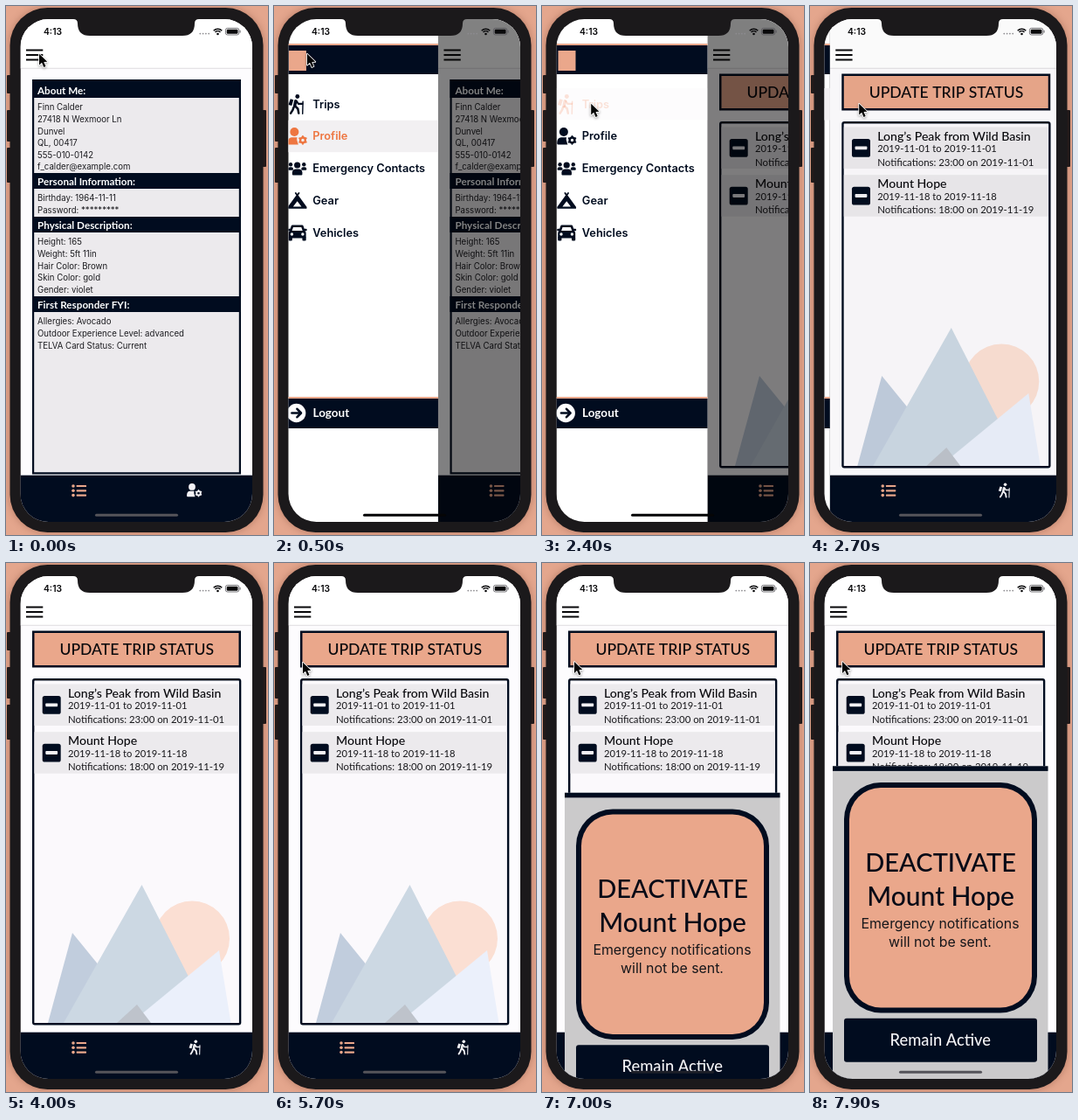
An HTML page with a canvas for the animation above (8 s loop, 300 by 605 pixels).

```html
<!DOCTYPE html>
<html lang="en">
<head>
<meta charset="utf-8">
<title>Trip planner app</title>
<style>
html, body { margin: 0; width: 100%; height: 100%; overflow: hidden; background: #e4a68d; }
canvas { display: block; width: 300px; height: 605px; }
</style>
</head>
<body>
<canvas id="stage"></canvas>
<script>
const W = 300, H = 605, LOOP = 8000;
const NAVY = '#010c1f', PEACH = '#eaa78b', ORANGE = '#ee7641', ROW = '#eceaed';
const SANS = 'Inter, Roboto, sans-serif', GEO = 'Lato, "Open Sans", sans-serif';
const LEFT = 16.5, RIGHT = 282, TOP = 15, BOTTOM = 590, DRAWER = 173;

const canvas = document.getElementById('stage');
const c = canvas.getContext('2d');
const ratio = window.devicePixelRatio || 1;
canvas.width = W * ratio;
canvas.height = H * ratio;

const clamp = v => Math.max(0, Math.min(1, v));
const ramp = (t, a, b) => clamp((t - a) / (b - a));

// Critically damped spring, time in ms
function spring(t) {
  if (t <= 0) return 0;
  const x = 0.01826 * t;
  return 1 - (1 + x) * Math.exp(-x);
}

function box(x, y, w, h, color) {
  c.fillStyle = color;
  c.fillRect(x, y, w, h);
}

function round(x, y, w, h, r, color) {
  c.fillStyle = color;
  c.beginPath();
  c.roundRect(x, y, w, h, r);
  c.fill();
}

function framed(x, y, w, h, b, r, edge, fill) {
  round(x, y, w, h, r, edge);
  round(x + b, y + b, w - 2 * b, h - 2 * b, Math.max(0, r - b), fill);
}

function dot(x, y, r, color) {
  c.fillStyle = color;
  c.beginPath();
  c.arc(x, y, r, 0, 7);
  c.fill();
}

function poly(points, color) {
  c.fillStyle = color;
  c.beginPath();
  points.forEach(p => c.lineTo(p[0], p[1]));
  c.closePath();
  c.fill();
}

function line(points, width, color) {
  c.strokeStyle = color;
  c.lineWidth = width;
  c.lineCap = c.lineJoin = 'round';
  c.beginPath();
  points.forEach(p => c.lineTo(p[0], p[1]));
  c.stroke();
}

function text(str, x, y, size, color, font = SANS, weight = 400, align = 'left') {
  c.font = `${weight} ${size}px ${font}`;
  c.textAlign = align;
  c.fillStyle = color;
  c.fillText(str, x, y);
}

function place(x, y, scale, draw) {
  c.save();
  c.translate(x, y);
  c.scale(scale, scale);
  draw();
  c.restore();
}

// Icons, drawn from their top left corner
function hiker(color) {
  dot(11.5, 2.6, 2.5, color);
  poly([[3.2, 5.5], [6.8, 6.5], [4.8, 13.5], [0.8, 12.4]], color);
  line([[9.4, 8], [8.2, 14]], 3.6, color);
  line([[9, 14], [12, 17], [13, 22.3]], 2.6, color);
  line([[7, 15.5], [6, 18.5], [3.6, 22.3]], 2.6, color);
  line([[10.5, 8], [12.6, 11.2], [17.5, 11.2]], 2.1, color);
  line([[18, 8.5], [17.6, 23]], 1.5, color);
}

function person(x, y, r, w, h, color) {
  dot(x, y, r, color);
  round(x - w / 2, y + r + 0.8, w, h, [w * 0.36, w * 0.36, 1, 1], color);
}

function userCog(color) {
  dot(7.7, 5, 5, color);
  c.fillStyle = color;
  c.beginPath();
  c.moveTo(0, 18);
  c.quadraticCurveTo(0, 11.2, 5, 11.2);
  c.lineTo(10.8, 11.2);
  c.lineTo(10.5, 14);
  c.lineTo(12.2, 19.6);
  c.lineTo(1.6, 19.6);
  c.quadraticCurveTo(0, 19.6, 0, 18);
  c.fill();
  c.strokeStyle = color;
  c.lineWidth = 2.4;
  c.beginPath();
  c.arc(17.3, 14.4, 2.9, 0, 7);
  c.stroke();
  for (let i = 0; i < 6; i++) {
    const a = Math.PI / 6 + i * Math.PI / 3, u = Math.cos(a), v = Math.sin(a);
    line([[17.3 + 3.7 * u, 14.4 + 3.7 * v], [17.3 + 4.4 * u, 14.4 + 4.4 * v]], 2, color);
  }
}

function users(color) {
  person(3.4, 3.2, 2.2, 6, 3.6, color);
  person(18.6, 3.2, 2.2, 6, 3.6, color);
  person(11, 4, 3.6, 11.5, 7, color);
}

function tent(color) {
  line([[9.2, 1], [21, 17.2]], 1.9, color);
  line([[12.8, 1], [1, 17.2]], 1.9, color);
  c.fillStyle = color;
  c.beginPath();
  [[11, 3.5], [20.5, 16.5], [22, 18.8], [0, 18.8], [1.5, 16.5]].forEach(p => c.lineTo(...p));
  c.closePath();
  [[11, 10.2], [6.2, 16.6], [15.8, 16.6]].forEach((p, i) => i ? c.lineTo(...p) : c.moveTo(...p));
  c.closePath();
  c.fill('evenodd');
}

function car(color) {
  line([[3.4, 7.5], [5.4, 1.8], [16.6, 1.8], [18.6, 7.5]], 2.6, color);
  round(0, 4.8, 4, 2.4, 1, color);
  round(18, 4.8, 4, 2.4, 1, color);
  c.fillStyle = color;
  c.beginPath();
  c.roundRect(1, 7, 20, 8.4, [3, 3, 1, 1]);
  for (const x of [4.8, 17.2]) {
    c.moveTo(x + 1.7, 11);
    c.arc(x, 11, 1.7, 0, 7);
  }
  c.fill('evenodd');
  round(1, 14, 4.2, 4.4, 1.2, color);
  round(16.8, 14, 4.2, 4.4, 1.2, color);
}

function list(color) {
  for (let i = 0; i < 3; i++) {
    dot(2, 2 + i * 5.3, 1.8, color);
    round(5.6, 0.9 + i * 5.3, 11.4, 2.2, 0.6, color);
  }
}

function header() {
  box(LEFT, TOP, RIGHT - LEFT, BOTTOM - TOP, '#fdfcfe');
  box(LEFT, TOP, RIGHT - LEFT, 56, '#fff');
  box(LEFT, 70.8, RIGHT - LEFT, 0.8, '#d6d5d8');
  for (let i = 0; i < 3; i++) box(23, 49.5 + i * 5.5, 19.3, 2, '#08080a');
}

function tabs(icon, x, y, scale) {
  box(LEFT, 536.7, RIGHT - LEFT, BOTTOM - 536.7, NAVY);
  place(75, 547, 1, () => list(PEACH));
  place(x, y, scale, () => icon('#f4f3f6'));
}

const sections = [
  ['About Me:', 84, 21, ['Finn Calder', '27418 N Wexmoor Ln', 'Dunvel', 'QL, 00417', '555-010-0142', 'f_calder@example.com']],
  ['Personal Information:', 191, 18, ['Birthday: 1964-11-11', 'Password: *********']],
  ['Physical Description:', 241, 18, ['Height: 165', 'Weight: 5ft 11in', 'Hair Color: Brown', 'Skin Color: gold', 'Gender: violet']],
  ['First Responder FYI:', 332, 18, ['Allergies: Avocado', 'Outdoor Experience Level: advanced', 'TELVA Card Status: Current']]
];

function profilePage() {
  header();
  framed(30, 84, 239, 451.5, 2.2, 0, NAVY, ROW);
  for (const [title, y, h, rows] of sections) {
    box(30, y, 239, h, NAVY);
    text(title, 36, y + h - 4.2, 11.7, '#fff', GEO, 700);
    rows.forEach((row, i) => text(row, 36, y + h + 14.3 + i * 13.6, 9.65, '#1c1c20'));
  }
  tabs(userCog, 207, 546, 0.78);
}

function trip(y, name, day, note) {
  box(32.5, y, 234, 47.5, ROW);
  round(41.7, y + 13.5, 21, 20.8, 2.6, NAVY);
  round(45.3, y + 21.9, 13.8, 3.8, 0.8, '#f4f2f5');
  text(name, 71, y + 15, 14.1, '#08080c', GEO, 500);
  text(`${day} to ${day}`, 71, y + 28.6, 11.2, '#17171b', GEO);
  text('Notifications: ' + note, 71, y + 44, 11.4, '#17171b', GEO);
}

function tripsPage() {
  header();
  framed(30, 77.5, 239, 42, 2.5, 0, NAVY, PEACH);
  text('UPDATE TRIP STATUS', 149.7, 105.3, 17.6, '#08080c', GEO, 500, 'center');
  framed(30, 132, 239.3, 396.5, 2.4, 3, NAVY, '#fbf9fc');
  dot(213, 429.5, 43, '#fbdfd3');
  poly([[76, 423], [48, 526], [160, 526]], '#c1cddd');
  poly([[155.5, 368], [66, 526], [236, 526]], '#ccd8e3');
  poly([[244, 443], [143, 526], [257.5, 526]], '#ebf0fb');
  poly([[150, 505], [127, 526], [166, 526]], '#bec3cb');
  trip(138.5, 'Long’s Peak from Wild Basin', '2019-11-01', '23:00 on 2019-11-01');
  trip(193.2, 'Mount Hope', '2019-11-18', '18:00 on 2019-11-19');
  tabs(hiker, 209, 545.5, 0.72);
}

const menu = [
  ['Trips', hiker, 101, 0.97],
  ['Profile', userCog, 139, 1],
  ['Emergency Contacts', users, 178, 1],
  ['Gear', tent, 213, 1],
  ['Vehicles', car, 250, 1]
];

function drawer(shift, active, fade) {
  c.save();
  c.translate(LEFT + shift, 0);
  box(0, TOP, DRAWER, BOTTOM - TOP, '#fff');
  box(0, 43, DRAWER, 2, PEACH);
  box(0, 45, DRAWER, 33, NAVY);
  box(2, 51, 20, 23, PEACH);
  menu.forEach(([label, icon, y, scale], i) => {
    const on = i === active, color = on ? ORANGE : NAVY;
    c.globalAlpha = i === 0 ? fade : 1;
    if (on) box(0, 94 + i * 36.7, DRAWER, 36.5, '#f2f0f2');
    place(0.7, y, scale, () => icon(color));
    text(label, 29.3, 116.7 + i * 36.7, 12.8, color, SANS, 600);
    c.globalAlpha = 1;
  });
  box(0, 447, DRAWER, 2, PEACH);
  box(0, 449, DRAWER, 34, NAVY);
  dot(10.7, 465.5, 10.7, '#fff');
  line([[5.5, 465.5], [15.5, 465.5]], 2.6, NAVY);
  line([[11.5, 460.8], [16, 465.5], [11.5, 470.2]], 2.6, NAVY);
  text('Logout', 29.5, 470, 13.5, '#fff', GEO, 700);
  c.restore();
}

function modal(dy) {
  c.save();
  c.translate(0, dy);
  box(26, 232.3, 246.5, 400, '#cbcacb');
  box(26, 232.3, 246.5, 5.6, NAVY);
  framed(39, 251, 221, 263.5, 6, 42, NAVY, PEACH);
  text('DEACTIVATE', 149.6, 353, 29, '#060a16', GEO, 500, 'center');
  text('Mount Hope', 149.6, 392, 30, '#060a16', GEO, 500, 'center');
  text('Emergency notifications', 149, 417.6, 15.9, '#17171b', SANS, 400, 'center');
  text('will not be sent.', 149, 439, 15.9, '#17171b', SANS, 400, 'center');
  round(39, 520.7, 221, 50, 3, NAVY);
  text('Remain Active', 149.3, 552, 18.3, '#f4f3f6', GEO, 500, 'center');
  c.restore();
}

function statusBar() {
  text('4:13', 43, 33, 10.3, '#08080a', SANS, 600);
  for (let i = 0; i < 4; i++) dot(222.3 + i * 3.3, 31.6, 0.9, '#8d8c90');
  c.strokeStyle = '#08080a';
  c.lineWidth = 1.5;
  c.lineCap = 'butt';
  for (const r of [4.2, 6.8]) {
    c.beginPath();
    c.arc(242.5, 33, r, -Math.PI * 0.75, -Math.PI * 0.25);
    c.stroke();
  }
  dot(242.5, 32, 1.3, '#08080a');
  c.lineWidth = 0.8;
  c.strokeStyle = '#55545a';
  c.beginPath();
  c.roundRect(251.4, 25.4, 15.4, 7.6, 2.2);
  c.stroke();
  round(252.7, 26.7, 12.8, 5, 1.2, '#08080a');
  box(267.6, 27.8, 0.9, 2.8, '#55545a');
}

function phone() {
  const dark = '#1b191b';
  for (const [x, y, h] of [[1, 79, 21], [1, 119, 36], [1, 162, 40], [292, 119, 65]])
    round(x, y, 6, h, 1, dark);
  c.save();
  c.shadowColor = 'rgba(90, 40, 25, 0.35)';
  c.shadowBlur = 8 * ratio;
  round(4.5, 2, 290, 600, 43, dark);
  c.restore();
}

function notch() {
  c.fillStyle = '#1b191b';
  c.beginPath();
  c.moveTo(77, TOP - 1);
  c.lineTo(77, TOP);
  c.quadraticCurveTo(82, TOP, 82, 20);
  c.quadraticCurveTo(82, 34, 96, 34);
  c.lineTo(202, 34);
  c.quadraticCurveTo(216, 34, 216, 20);
  c.quadraticCurveTo(216, TOP, 221, TOP);
  c.lineTo(221, TOP - 1);
  c.fill();
}

// time, x, y of the pointer tip
const path = [
  [0, 37.3, 54], [1000, 37.3, 54], [1700, 55.5, 111], [2750, 55.5, 111], [3250, -16, 135],
  [5000, -16, 130], [5500, 32.3, 113], [6050, 32.3, 113], [6350, 36.3, 112.3], [LOOP, 36.3, 112.3]
];

function pointer(t) {
  const i = path.findIndex(p => p[0] > t), a = path[i - 1], b = path[i];
  const k = ramp(t, a[0], b[0]), e = k * k * (3 - 2 * k);
  c.save();
  c.translate(a[1] + (b[1] - a[1]) * e, a[2] + (b[2] - a[2]) * e);
  c.shadowColor = 'rgba(0, 0, 0, 0.4)';
  c.shadowBlur = 3 * ratio;
  c.shadowOffsetY = ratio;
  const arrow = [[0.7, 0.8], [0.7, 13.6], [3.7, 10.8], [6, 16], [8.2, 15], [6, 10], [10, 9.8], [0.7, 0.8]];
  line(arrow, 1.7, '#fff');
  c.shadowColor = 'transparent';
  poly(arrow, '#050505');
  c.restore();
}

function draw(t) {
  c.setTransform(ratio, 0, 0, ratio, 0, 0);
  box(0, 0, W, H, '#e4a68d');
  phone();

  const open = t < 2420 ? spring(t - 130) : 1 - spring(t - 2420);
  const onTrips = t >= 2300;
  const fade = 1 - 0.8 * (t < 2440 ? ramp(t, 2150, 2290) : 1 - ramp(t, 2440, 2690));

  c.save();
  c.beginPath();
  c.roundRect(LEFT, TOP, RIGHT - LEFT, BOTTOM - TOP, 32);
  c.clip();
  c.save();
  c.translate(DRAWER * open, 0);
  if (onTrips) tripsPage(); else profilePage();
  c.restore();
  if (open > 0.001) {
    box(LEFT + DRAWER * open, TOP, W, H, `rgba(0, 0, 0, ${0.5 * open})`);
    drawer(DRAWER * (open - 1), onTrips ? 0 : 1, fade);
  }
  const rise = spring(t - 6745);
  if (rise > 0) modal(575 * (1 - rise));
  const rising = rise > 0 && rise < 0.985;
  round(102, 580.8, 95, 3, 1.5, open > 0.5 ? '#050506' : rising ? '#1d1f28' : '#55545a');
  statusBar();
  c.restore();
  notch();
  pointer(t);
}

function tick(now) {
  draw(now % LOOP);
  requestAnimationFrame(tick);
}
draw(0);
requestAnimationFrame(tick);
</script>
</body>
</html>
```
